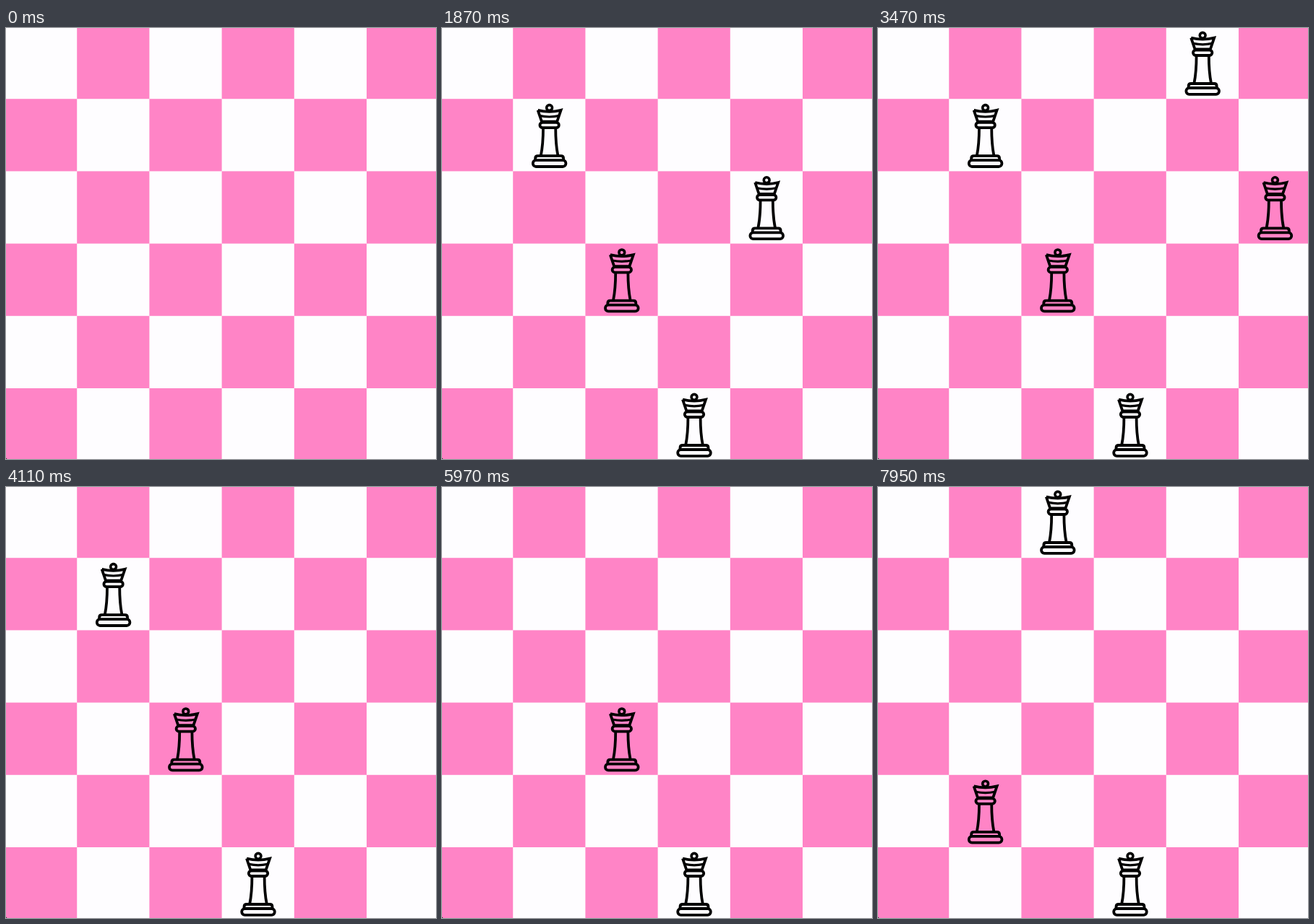
An HTML page for the animation above (8000 ms loop, 595 by 597 pixels).

```html
<!DOCTYPE html>
<html lang="en">
<head>
<meta charset="utf-8">
<title>Queens backtracking</title>
<style>
  html, body { margin: 0; width: 100%; height: 100%; overflow: hidden; background: #fefdff; }
  svg { display: block; width: 595px; height: 597px; }
</style>
</head>
<body>
<svg viewBox="0 0 595 597">
  <defs>
    <!-- Drawn around the vertical axis of a cell, y from the cell top -->
    <g id="queen" fill="none" stroke="#000" stroke-width="3.8" stroke-linejoin="round">
      <circle cy="12.3" r="3.9" stroke-width="3.6"/>
      <path d="M-16 15.6 L-10.6 31.5 H10.6 L16 15.6 Q0 19.6 -16 15.6" stroke-linejoin="miter"/>
      <path d="M-13 23.4 Q0 26.2 13 23.4" stroke-width="3.2"/>
      <rect x="-13.2" y="32.6" width="26.4" height="7.4" rx="3.7"/>
      <path d="M-8.6 40 Q-8.6 63 -11.8 78.5 M8.6 40 Q8.6 63 11.8 78.5"/>
      <path d="M-19.5 85 V82.5 Q-19.5 79 -16 79 H16 Q19.5 79 19.5 82.5 V85"/>
      <rect x="-22.8" y="85" width="45.6" height="8.8" rx="4.2"/>
    </g>
  </defs>
  <g id="board" fill="#ff84c6"></g>
  <g id="pieces"></g>
  <path d="M0 595.5 L1.5 597 H0Z" fill="#222"/>
</svg>
<script>
const SIZE = 6, PITCH = 100.2, OFFSET = -2;
const LOOP = 8000, STEP = 320, LEAD = 55;

// Column and row of each placement; "-" takes the queen of that column back.
const moves = ("35 23 11 42 54 5- 4- 40 54 5- 52 5- 4- 1- " +
               "10 42 4- 1- 2- 20 14 43 51 5- 4-").split(" ");

const add = (parentId, tag, attrs) => {
  const node = document.createElementNS("http://www.w3.org/2000/svg", tag);
  for (const name in attrs) node.setAttribute(name, attrs[name]);
  return document.getElementById(parentId).appendChild(node);
};
const edge = i => OFFSET + PITCH * i;

for (let row = 0; row < SIZE; row++)
  for (let col = 0; col < SIZE; col++)
    if ((row + col) % 2)
      add("board", "rect", { x: edge(col), y: edge(row), width: PITCH, height: PITCH });

const queens = Array.from({ length: SIZE }, () => add("pieces", "use", { href: "#queen" }));

function show(count) {
  const rows = Array(SIZE).fill("-");
  for (const [col, row] of moves.slice(0, count)) rows[col] = row;
  queens.forEach((queen, col) => {
    const placed = rows[col] !== "-";
    queen.style.display = placed ? "" : "none";
    if (placed)
      queen.setAttribute("transform", `translate(${edge(col + 0.503)} ${edge(+rows[col])})`);
  });
}

let start;
function tick(now) {
  start ??= now;
  show(Math.floor(((now - start) % LOOP + LEAD) / STEP));
  requestAnimationFrame(tick);
}
show(0);
requestAnimationFrame(tick);
</script>
</body>
</html>
```
